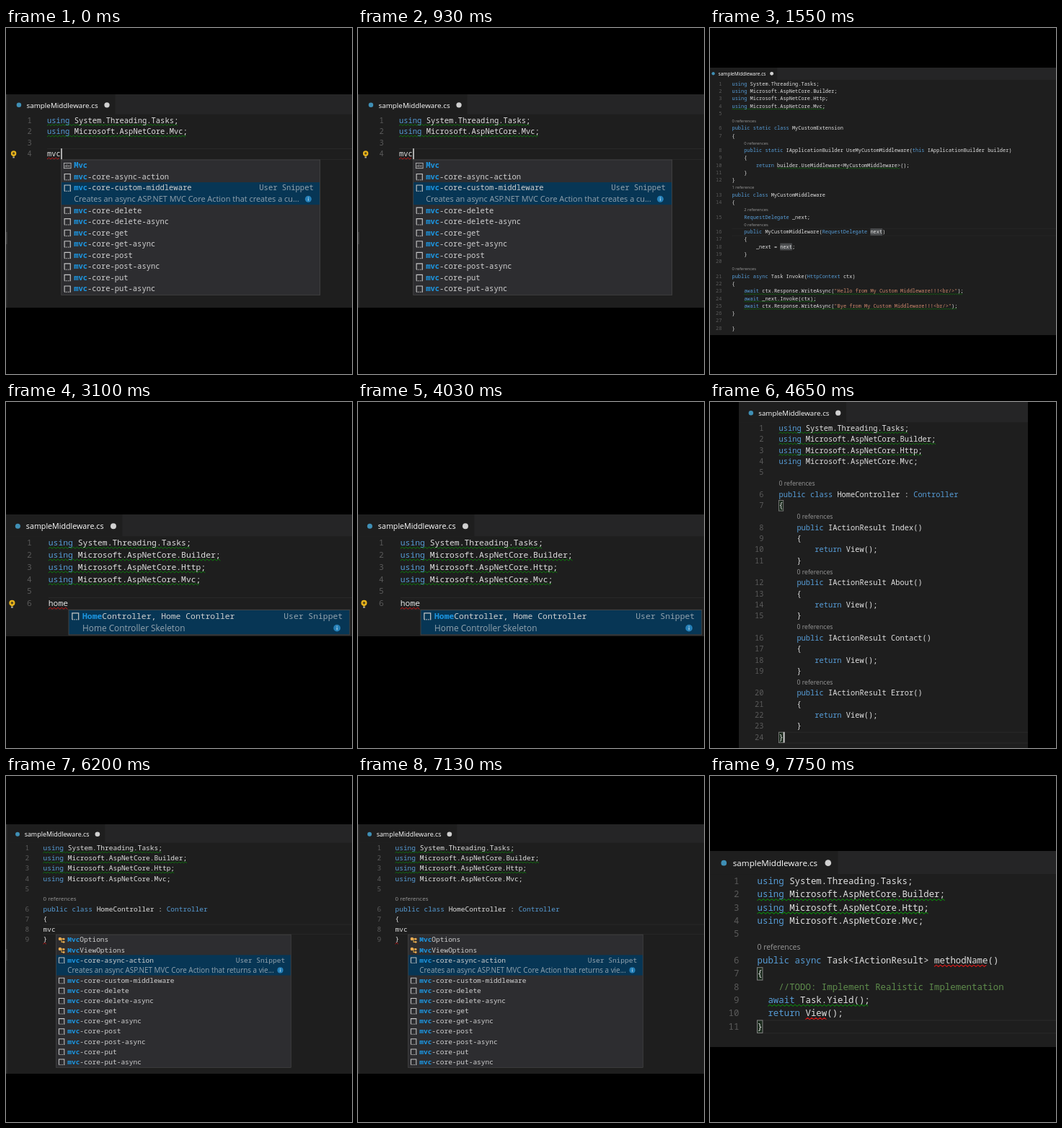
An HTML page with a canvas that plays this animation: 480 px wide and 480 px high, repeating every 9300 ms.

```html
<!DOCTYPE html>
<html lang="en">
<head>
<meta charset="utf-8">
<title>Snippets in a code editor</title>
<style>
  html, body { margin: 0; width: 100%; height: 100%; overflow: hidden; background: #000; }
  canvas { display: block; width: 480px; height: 480px; }
</style>
</head>
<body>
<canvas id="stage" width="480" height="480"></canvas>
<script>
const ctx = document.getElementById('stage').getContext('2d');

// Editor metrics, before each scene's zoom is applied
const HOLD = 1550, CH = 7.72, ROW = 19, ITEM = 19.1;
const mono = weight => `${weight} ${CH / 0.6}px "Noto Sans Mono", monospace`;
const MONO = mono(500);
const ui = (size, weight = 400) => `${weight} ${size}px "Open Sans", sans-serif`;

const C = {
  editor: '#1e1e1e', bar: '#252526', text: '#e0e0e0', keyword: '#569cd6', string: '#ce8a6c',
  comment: '#5f8c4c', number: '#5a5a5a', lens: '#999', green: '#0b800b', red: '#d41616',
  popup: '#2d2d30', border: '#454545', selected: '#073655', match: '#1c96e2', dim: '#93a3ae'
};

const TOKENS = new RegExp([
  '(?<string>"[^"]*")', '(?<comment>//.*)',
  '(?<keyword>\\b(?:using|public|static|class|this|return|async|await|RequestDelegate|HttpContext|Controller)\\b)',
  '(?<text>\\w+|[^\\w\\s"]+?)'
].join('|'), 'g');

const usings = (...names) => names.map(name => `using ${name};`);
const TASKS = 'System.Threading.Tasks', MVC = 'Microsoft.AspNetCore.Mvc';
const ALL = usings(TASKS, 'Microsoft.AspNetCore.Builder', 'Microsoft.AspNetCore.Http', MVC);
const action = name => `    ~0 references
    public IActionResult ${name}()
    {
        return View();
    }`;
const verbs = ['delete', 'get', 'post', 'put'].flatMap(v => [`mvc-core-${v}`, `mvc-core-${v}-async`]);
const wavy = (color, ...pairs) => pairs.map(([line, part]) => ({ color, line, part }));
const greenLines = (...lines) => wavy(C.green, ...lines.map(line => [line]));

// x, y: first code line; box: visible area; a "~" line is a reference hint without a number
const scenes = [
  {
    x: 57, y: 128, zoom: 0.814, box: [0, 92, 480, 296], edge: [283, 17],
    code: [...usings(TASKS, MVC), '', 'mvc'].join('\n'),
    waves: [...greenLines(1, 2), ...wavy(C.red, [4])],
    current: 4, cursor: true,
    popup: {
      prefix: 3, selected: 2, icons: ['word'],
      items: ['Mvc', 'mvc-core-async-action', 'mvc-core-custom-middleware', ...verbs],
      note: 'Creates an async ASP.NET MVC Core Action that creates a cu...'
    }
  },
  {
    x: 30.5, y: 77.3, zoom: 0.5405, box: [0, 55, 480, 371],
    code: `${ALL.join('\n')}

~0 references
public static class MyCustomExtension
{
    ~0 references
    public static IApplicationBuilder UseMyCustomMiddleware(this IApplicationBuilder builder)
    {
        return builder.UseMiddleware<MyCustomMiddleware>();
    }
}
~1 reference
public class MyCustomMiddleware
{
    ~2 references
    RequestDelegate _next;
    ~0 references
    public MyCustomMiddleware(RequestDelegate next)
    {
        _next = next;
    }

~0 references
public async Task Invoke(HttpContext ctx)
{
    await ctx.Response.WriteAsync("Hello from My Custom Middleware!!!<br/>");
    await _next.Invoke(ctx);
    await ctx.Response.WriteAsync("Bye from My Custom Middleware!!!<br/>");
}

}`,
    waves: [...greenLines(4, 23, 24, 25), ...wavy(C.green, [10, 'builder.UseMiddleware<MyCustomMiddleware>'])],
    words: [[16, 'next)'], [18, 'next;']], current: 16
  },
  {
    x: 58.8, y: 195.2, zoom: 0.884, box: [0, 156, 480, 169],
    code: [...ALL, '', 'home'].join('\n'),
    waves: [...greenLines(1, 2, 3, 4), ...wavy(C.red, [6])],
    current: 6,
    popup: {
      prefix: 4, selected: 0, icons: ['snippet'],
      items: ['HomeController, Home Controller'], note: 'Home Controller Skeleton'
    }
  },
  {
    x: 95.5, y: 36.2, zoom: 0.806, box: [40, 0, 401, 480],
    code: `${ALL.join('\n')}

~0 references
public class HomeController : Controller
{
${['Index', 'About', 'Contact', 'Error'].map(action).join('\n')}
}`,
    waves: greenLines(1, 2, 3), brackets: [7, 24], current: 24, cursor: true
  },
  {
    x: 51.5, y: 100, zoom: 0.739, box: [0, 67, 480, 346], edge: [240, 16],
    code: `${ALL.join('\n')}

~0 references
public class HomeController : Controller
{
mvc
}`,
    waves: [...greenLines(1, 2, 3), ...wavy(C.red, [9])],
    current: 8,
    popup: {
      prefix: 3, selected: 2, icons: ['class', 'class'],
      items: ['MvcOptions', 'MvcViewOptions', 'mvc-core-async-action', 'mvc-core-custom-middleware', ...verbs],
      note: 'Creates an async ASP.NET MVC Core Action that returns a vie...'
    }
  },
  {
    x: 65.5, y: 145.7, zoom: 0.964, box: [0, 104, 480, 272],
    code: `${ALL.join('\n')}

~0 references
public async Task<IActionResult> methodName()
{
    //TODO: Implement Realistic Implementation
  await Task.Yield();
  return View();
}`,
    waves: [...greenLines(2, 3, 9), ...wavy(C.red, [6, 'methodName'], [10, 'View'])],
    brackets: [7, 11], current: 11
  }
];

function rect(color, x, y, w, h) {
  ctx.fillStyle = color;
  ctx.fillRect(x, y, w, h);
}

function outline(color, x, y, w, h) {
  ctx.strokeStyle = color;
  ctx.lineWidth = 1;
  ctx.strokeRect(x, y, w, h);
}

function dot(color, x, y, r) {
  ctx.fillStyle = color;
  ctx.beginPath();
  ctx.arc(x, y, r, 0, Math.PI * 2);
  ctx.fill();
}

function write(text, x, y, color, font = MONO, align = 'left') {
  ctx.font = font;
  ctx.textAlign = align;
  ctx.fillStyle = color;
  ctx.fillText(text, x, y + 4.6);
}

function squiggle(color, x, y, width) {
  ctx.strokeStyle = color;
  ctx.lineWidth = 1.1;
  ctx.beginPath();
  for (let i = 0; i * 3 <= width; i++) ctx.lineTo(x + i * 3, y + (i % 2 ? -1.2 : 1.2));
  ctx.stroke();
}

function drawTab() {
  rect(C.bar, -200, -46, 1200, 36);
  rect(C.editor, -200, -46, 316, 36);
  dot('#3f8fb5', -48, -26, 4);
  write('sampleMiddleware.cs', -35, -26, '#fff', ui(12.1, 500));
  dot('#d0d0d0', 102, -26, 4.5);
}

function drawBulb(y) {
  dot('#e8b41c', -57, y - 1.5, 4.6);
  dot('#5a4a1e', -57, y - 1.5, 2);
  rect('#e8b41c', -58.5, y + 1, 3, 3);
  rect('#b8b8b8', -58.5, y + 4.5, 3, 1.8);
}

function drawIcon(kind, x, y) {
  if (kind === 'word') {
    outline('#c5c5c5', x - 6, y - 4.5, 12, 9);
    write('abc', x, y - 2, '#c5c5c5', ui(6), 'center');
  } else if (kind === 'class') {
    ctx.strokeStyle = '#d9a441';
    ctx.lineWidth = 1.5;
    ctx.beginPath();
    ctx.moveTo(x - 3, y - 2);
    ctx.lineTo(x + 4, y - 2);
    ctx.moveTo(x, y - 2);
    ctx.lineTo(x, y + 4);
    ctx.lineTo(x + 4, y + 4);
    ctx.stroke();
    dot('#e8ab53', x - 3, y - 2, 3);
    dot('#e8ab53', x + 4, y - 1.5, 2);
    dot('#e8ab53', x + 4, y + 4, 2);
  } else {
    const color = '#c5c5c5';
    ctx.strokeStyle = color;
    ctx.lineWidth = 1.4;
    ctx.beginPath();
    ctx.moveTo(x - 5, y + 5);
    ctx.lineTo(x - 5, y - 5);
    ctx.lineTo(x + 5, y - 5);
    ctx.lineTo(x + 5, y + 5);
    ctx.stroke();
    for (let i = -5; i <= 4; i += 3) rect(color, x + i, y + 4.5, 1.6, 1.4);
  }
}

function drawPopup({ prefix, selected, icons, items, note }, rowY) {
  const x = prefix * CH + 1, top = rowY + 10.5, width = 441, right = x + width;
  const height = (items.length + 1) * ITEM + 1;
  rect(C.popup, x, top, width, height);
  rect(C.selected, x, top + selected * ITEM, width, 2 * ITEM);
  outline(C.border, x, top, width, height);
  items.forEach((item, i) => {
    const y = top + 9.4 + (i + (i > selected)) * ITEM;
    drawIcon(icons[i], x + 10.5, y + 0.5);
    write(item.slice(0, prefix), x + 21.5, y, C.match, mono(700));
    write(item.slice(prefix), x + 21.5 + prefix * CH, y, '#d0d0d0');
  });
  const y = top + 9.4 + selected * ITEM;
  write('User Snippet', right - 11, y, C.dim, MONO, 'right');
  write(note, x + 21.5, y + ITEM, C.dim, ui(13.42));
  dot('#2580b8', right - 20, y + ITEM, 5.5);
  rect('#b5d3e8', right - 20.6, y + ITEM - 1, 1.3, 4);
  rect('#b5d3e8', right - 20.6, y + ITEM - 3.3, 1.3, 1.3);
}

function drawCode(scene) {
  const lines = [null], rowYs = [null];
  const hints = [];
  scene.code.split('\n').forEach((line, row) => {
    if (line.includes('~')) hints.push([line, row * ROW]);
    else {
      lines.push(line);
      rowYs.push(row * ROW);
    }
  });

  const currentY = rowYs[scene.current];
  rect('#2b2b2b', 0, currentY - 9, 1000, 1);
  rect('#2b2b2b', 0, currentY + 9.5, 1000, 1);

  for (const [line, part] of scene.words || [])
    rect('#4a4c4e', lines[line].lastIndexOf(part) * CH, rowYs[line] - 8.5, 4 * CH, 18);
  for (const line of scene.brackets || []) {
    rect('#1a2a1c', 0, rowYs[line] - 8.5, CH, 18);
    outline('#888', 0, rowYs[line] - 8.5, CH, 18);
  }

  for (const { color, line, part = lines[line].trim() } of scene.waves)
    squiggle(color, lines[line].indexOf(part) * CH, rowYs[line] + 8, part.length * CH);

  for (const [line, y] of hints)
    write(line.trim().slice(1), line.indexOf('~') * CH, y - 0.4, C.lens, ui(10.8));
  for (let n = 1; n < lines.length; n++) {
    write(n, -26, rowYs[n], C.number, MONO, 'right');
    for (const token of lines[n].matchAll(TOKENS)) {
      const kind = Object.keys(token.groups).find(key => token.groups[key]);
      write(token[0], token.index * CH, rowYs[n], C[kind]);
    }
  }

  if (scene.cursor) rect('#e0e0e0', lines[scene.current].length * CH + 0.5, currentY - 9, 1.8, 18.5);
  if (scene.popup) {
    if (scene.waves.some(w => w.color === C.red && w.line === scene.current)) drawBulb(currentY + 1);
    drawPopup(scene.popup, currentY);
  }
}

function drawScene(scene) {
  rect('#000', 0, 0, 480, 480);
  ctx.save();
  ctx.beginPath();
  ctx.rect(...scene.box);
  ctx.clip();
  rect(C.editor, ...scene.box);
  ctx.save();
  ctx.translate(scene.x, scene.y);
  ctx.scale(scene.zoom, scene.zoom);
  drawTab();
  drawCode(scene);
  ctx.restore();
  if (scene.edge) {
    rect('#2d2d2d', 0, scene.box[1], 1.5, scene.box[3]);
    rect('#454545', 0, scene.edge[0], 1.5, scene.edge[1]);
  }
  ctx.restore();
}

function tick() {
  drawScene(scenes[Math.floor(performance.now() / HOLD) % scenes.length]);
  requestAnimationFrame(tick);
}
tick();
</script>
</body>
</html>
```
